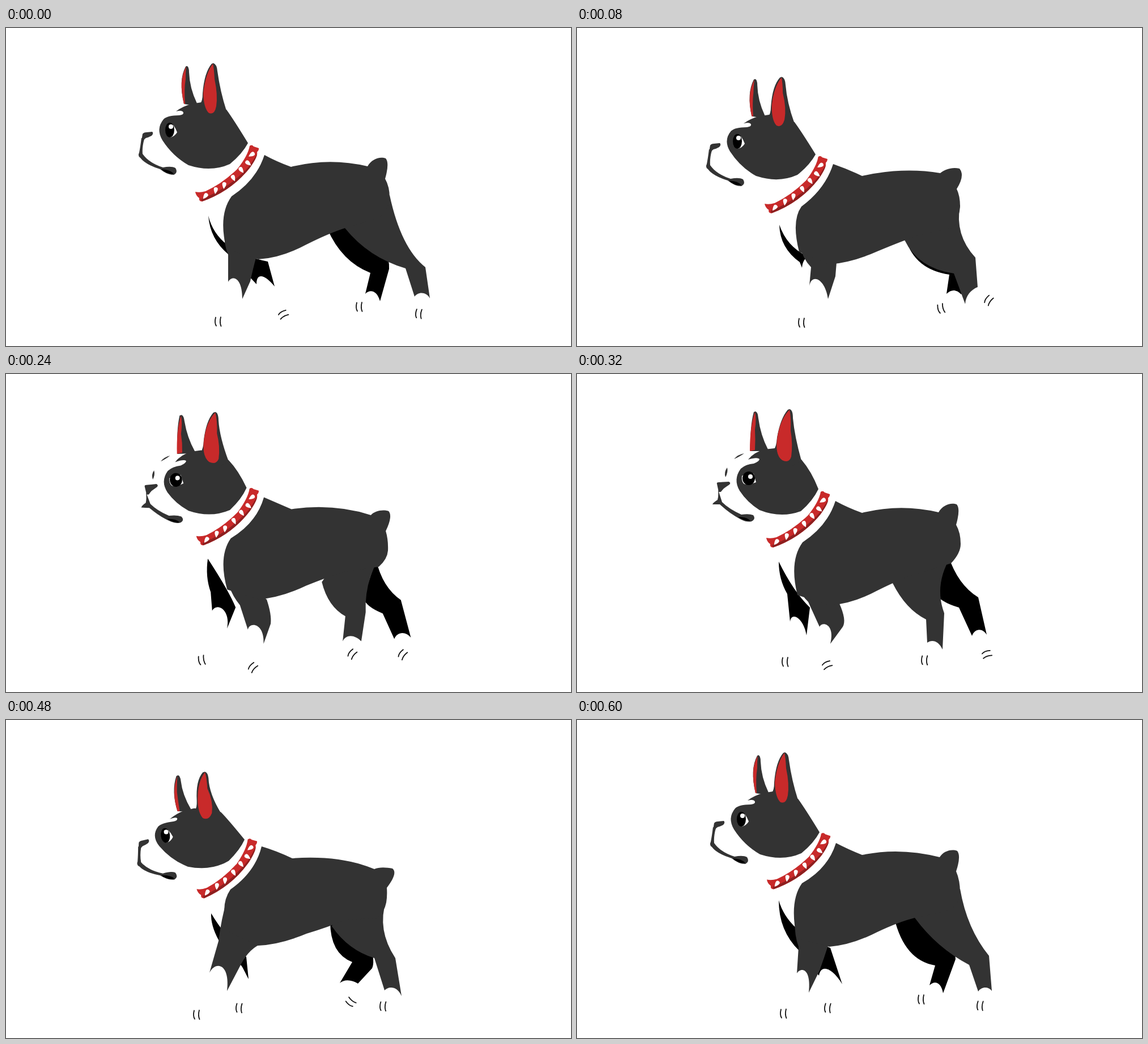
Animation, 997 px wide and 561 px high, one loop 0.64 s. Source, as an HTML page:

```html
<!DOCTYPE html>
<html lang="en">
<head>
<meta charset="utf-8">
<title>Walking dog</title>
<style>
  html, body { margin: 0; width: 100%; height: 100%; overflow: hidden; background: #fff; }
  svg { display: block; width: 100%; height: 100%; }
  .coat { fill: #333; }
  .shade { fill: #000; }
  .red { fill: #c82a2a; }
  .wine { fill: #8e1f1f; }
  .white { fill: #fff; }
  .toes { fill: none; stroke: #111; stroke-width: 1.8; stroke-linecap: round; }
</style>
</head>
<body>
<svg id="stage" viewBox="0 0 997 561">
  <g id="far"></g>
  <g id="near"></g>
  <g id="collar">
    <path class="red" d="M334 289Q342 291 352 288Q381 275 408 249Q427 225 430 208Q434 205 437 209L446 212Q447 215 443 219Q445 226 430 247Q397 288 346 306Q340 306 341 300Q335 296 334 289Z"/>
    <path class="wine" d="M443 222Q443 229 430 247Q397 288 346 306L344 302Q392 284 427 246Q437 233 443 222Z"/>
  </g>
  <g id="head"></g>
</svg>
<script>
const CYCLE = 640, STEP = 40, STRIDE = CYCLE / 2;
const NUMBER = /-?\d+(\.\d+)?/g;
const $ = id => document.getElementById(id);
const nums = s => s.match(NUMBER).map(Number);

function add(parent, cls, d) {
  const el = document.createElementNS('http://www.w3.org/2000/svg', 'path');
  el.setAttribute('class', cls);
  if (d) el.setAttribute('d', d);
  return parent.appendChild(el);
}

// Puts new numbers into a path of the same structure.
function reshape(template, values) {
  let i = 0;
  return template.replace(NUMBER, () => ' ' + +values[i++].toFixed(1));
}

// Periodic smooth curve through poses keyed by time in ms.
function track(keys, period) {
  const times = Object.keys(keys).map(Number);
  const poses = times.map(t => nums(keys[t]));
  const n = times.length;
  const knot = i => {
    const lap = Math.floor(i / n), k = i - lap * n;
    return { t: times[k] + lap * period, v: poses[k] };
  };
  return time => {
    const t = time % period;
    let i = n - 1;
    while (times[i] > t) i--;
    const [a, b, c, d] = [-1, 0, 1, 2].map(o => knot(i + o));
    const h = c.t - b.t, u = (t - b.t) / h, u2 = u * u, u3 = u2 * u;
    return b.v.map((p, j) => {
      const m0 = (c.v[j] - a.v[j]) / (c.t - a.t) * h;
      const m1 = (d.v[j] - p) / (d.t - b.t) * h;
      return (2 * u3 - 3 * u2 + 1) * p + (u3 - 2 * u2 + u) * m0
           + (3 * u2 - 2 * u3) * c.v[j] + (u3 - u2) * m1;
    });
  };
}

const updates = [];

function shape(parent, cls, keys, period = CYCLE) {
  const el = add($(parent), cls), at = track(keys, period);
  updates.push(t => el.setAttribute('d', reshape(keys[0], at(t))));
}

// Keys are x, y and angle.
function toes(parent, keys) {
  const el = add($(parent), 'toes', 'M-4-7.5Q-6.5 2-3 7.5M5-8Q2.5 1 5.5 8'), at = track(keys, CYCLE);
  updates.push(t => {
    const [x, y, r] = at(t);
    el.setAttribute('transform', `translate(${x} ${y}) rotate(${r})`);
  });
}

// Far legs
shape('far', 'shade', {
  0: 'M567 354Q592 412 643 432L634 469C643 460 655 464 660 482L676 425Q678 395 640 330Z',
  80: 'M580 372Q596 426 657 435L652 469C660 462 668 460 678 470L690 440Q670 400 640 370Z',
  160: 'M625 400Q628 424 655 436L667 469C672 460 686 458 696 468L683 408Q658 385 650 345Z',
  320: 'M630 385Q640 402 674 412L697 462C702 448 716 448 723 460L708 394Q672 372 655 320Z',
  400: 'M640 380Q645 420 668 432L674 439C677 440 680 443 682 445L686 390Q668 380 660 355Z',
  480: 'M572 355Q572 412 611 427L589 464C597 457 610 458 621 465L646 438Q656 416 620 335Z',
  600: 'M560 350Q578 424 632 433L622 468C632 458 643 464 646 482L668 422Q668 395 625 330Z'
});
shape('far', 'shade', {
  0: 'M357 331Q360 372 392 399L442 452C442 430 458 436 474 456L462 412Q372 394 357 331Z',
  80: 'M357 347Q358 388 393 413L397 423C398 412 402 408 405 405L405 402Q370 385 357 347Z',
  160: 'M357 328Q350 362 360 390L364 403C378 394 398 408 382 432L402 414Q400 386 357 328Z',
  320: 'M356 331Q356 362 371 388L376 437C378 418 400 430 405 461L411 412Q382 384 356 331Z',
  400: 'M361 358Q366 388 390 416L418 446C420 450 421 454 423 459L424 438Q374 394 361 358Z',
  480: 'M362 341Q361 362 375 388L414 432C418 436 422 446 428 457L424 418Q385 380 362 341Z',
  600: 'M356 318Q356 372 392 407L427 451C430 432 448 434 468 466L447 402Q372 374 356 318Z'
});
toes('far', { 0: '623 492 0', 80: '642 495 -14', 160: '666 492 0', 320: '723 494 72', 400: '688 472 65', 480: '608 498 -50', 600: '607 493 0' });
toes('far', { 0: '489 505 62', 80: '434 424 20', 160: '369 471 -55', 240: '345 505 -10', 320: '367 508 0', 400: '395 508 0', 480: '411 508 4', 600: '442 508 5' });

// Near legs and trunk
shape('near', 'coat', {
  0: 'M598 353Q640 405 705 424L721 474C726 466 741 464 748 477L740 422Q697 388 677 295L590 320Z',
  40: 'M588 364Q625 412 695 430L722 480C728 470 738 464 750 462L737 414Q690 385 677 304L590 320Z',
  80: 'M578 374Q602 424 665 433L685 487C686 472 695 462 707 457L703 405Q666 365 676 312L590 320Z',
  160: 'M563 367Q565 408 596 423L590 472C594 452 612 452 626 457L636 418Q646 352 672 310L590 320Z',
  320: 'M557 369Q580 415 616 433L618 474C626 468 638 470 645 486L648 422Q625 360 677 298L590 320Z',
  400: 'M575 375Q598 418 633 431L642 477C648 470 662 470 667 485L669 432Q648 375 676 312L590 320Z',
  480: 'M575 364Q604 406 650 420L668 477C674 470 690 468 698 487L687 420Q654 370 671 318L590 320Z',
  600: 'M596 349Q635 402 692 432L708 479C714 470 726 470 732 478L727 416Q688 368 676 298L590 320Z'
});
shape('near', 'coat', {
  0: 'M398 310Q376 362 392 400L392 448C398 436 417 438 417 478L431 447Q436 424 441 406Z',
  80: 'M396 330Q382 390 413 422L410 455C414 432 438 442 443 478L456 438Q457 425 458 414Z',
  160: 'M392 340Q388 375 414 415L417 454C420 434 448 438 452 475L458 434Q456 415 456 395Z',
  320: 'M392 340Q384 380 408 402L428 446C432 436 456 440 447 476L469 446Q476 434 463 405Z',
  400: 'M394 340Q385 385 387 405L383 432C400 416 412 440 396 467L428 437Q440 427 455 413Z',
  480: 'M390 316Q380 350 375 390L359 446C370 424 396 430 390 478L411 438Q426 406 448 396Z',
  600: 'M396 305Q376 360 391 400L388 447C394 436 414 436 409 481L428 442Q436 420 443 398Z'
});
shape('near', 'coat', {
  0: 'M456 224Q478 236 503 245Q570 228 638 244C645 231 660 226 670 230Q677 238 669 266Q677 280 677 300Q677 316 660 334L598 353Q570 362 530 382Q485 406 445 408L389 390Q374 330 398 297Q442 268 456 224Z',
  80: 'M452 240Q478 249 503 261Q575 245 641 256C650 249 662 245 675 248Q685 260 670 284Q676 296 676 315Q675 332 665 352L605 365Q578 374 530 394Q485 414 445 417L392 395Q378 340 396 315Q438 284 452 240Z',
  160: 'M451 223Q478 231 505 244Q590 238 650 263C658 259 672 260 682 262Q692 270 672 296Q673 310 671 322Q668 338 655 350L600 352Q570 365 530 377Q485 396 445 398L395 375Q375 330 396 299Q440 268 451 223Z',
  280: 'M457 217Q478 228 503 238Q570 224 640 242C646 232 660 227 671 231Q678 240 669 267Q676 283 676 305Q676 320 660 335L596 349Q568 356 530 374Q485 397 445 400L388 385Q374 320 397 288Q443 262 457 217Z'
}, STRIDE);
toes('near', { 0: '728 504 6', 40: '757 489 40', 80: '726 480 36', 160: '628 482 70', 320: '613 505 2', 400: '635 505 0', 480: '665 505 3', 600: '711 504 5' });
toes('near', { 0: '374 518 0', 80: '396 520 0', 160: '416 520 0', 320: '441 513 65', 400: '382 504 -60', 480: '336 520 0', 600: '364 518 0' });

// Collar: spikes are x, y and angle
for (const [x, y, r] of [[352, 296, 38], [370, 286, 8], [385, 277, 6], [401, 264, -25], [415, 250, -35], [427, 238, -50], [434, 223, 58]])
  add($('collar'), 'white', 'M0 7Q-5-1-3-4Q0-6.5 3-4Q5-1 0 7Z').setAttribute('transform', `translate(${x} ${y}) rotate(${r})`);
const collarAt = track({ 0: '0 0 0', 80: '-3.5 20 -1', 160: '0 5.5 -4', 280: '1 -7.5 0' }, STRIDE);
updates.push(t => {
  const [x, y, r] = collarAt(t);
  $('collar').setAttribute('transform', `translate(${x} ${y}) rotate(${r} 390 256)`);
});

// Head: each part in profile, turned to the viewer and, for some, with ears dropped
const headParts = [
  ['coat',
    'M319 67Q323 68 323 78Q324 106 337 133L326 136L314 134Q304 92 317 68Z',
    'M315 66Q319 67 320 78Q324 108 337 133L325 136L306 136Q305 92 312 67Z',
    'M323 77Q327 78 327 88Q327 112 339 139L328 142L315 140Q308 104 320 78Z'],
  ['red',
    'M318 68Q304 92 314 134L316 134Q314 108 317 90Q317 76 318 68Z',
    'M314 67Q305 92 305 136L314 134Q315 116 314 98Q317 78 314 67Z',
    'M322 78Q308 104 315 140L319 140Q318 118 318 106Q320 86 322 78Z'],
  ['coat',
    'M427 203Q417 222 395 240Q362 255 322 242Q294 226 276 198Q264 178 278 161Q285 154 306 154Q314 153 313 149Q311 144 300 147Q312 138 327 134L345 131L389 144Q402 162 427 203Z',
    'M426 203Q416 224 395 242Q360 255 322 240Q300 226 287 206Q275 186 289 167Q298 159 312 158Q322 154 322 150Q318 146 302 151Q312 138 331 133L349 131L396 151Q414 172 426 203Z',
    'M427 203Q417 220 395 237Q362 252 322 239Q294 224 276 197Q264 178 278 163Q285 157 306 157Q314 156 313 152Q311 149 300 152Q312 144 327 140L345 138L391 150Q402 164 427 203Z'],
  ['coat',
    'M366 62Q372 64 373 76Q378 112 389 146L372 160L342 134Q347 130 347 115Q350 78 363 63Z',
    'M375 62Q381 63 381 78Q384 110 396 153L376 164L347 134Q352 128 353 112Q359 78 372 63Z',
    'M371 76Q376 78 376 88Q374 116 391 152L374 166L346 141Q350 138 351 125Q353 90 367 77Z'],
  ['red',
    'M365 63Q352 80 348 115Q349 142 358 150Q368 154 371 138Q374 118 368 90Q367 70 365 63Z',
    'M375 63Q360 78 354 108Q348 142 362 152Q374 158 378 146Q381 124 377 100Q378 76 375 63Z',
    'M371 77Q358 90 354 115Q349 144 358 157Q368 163 375 150Q380 130 372 106Q373 86 371 77Z'],
  ['white',
    'M284 188Q285 192 290 193Q298 191 302 184Q299 176 295 171Q288 170 284 188Z',
    'M291 180Q290 190 295 194Q303 196 316 191Q314 184 312 176Q300 172 291 180Z'],
  ['shade',
    'M281 180A8 13 0 1 0 297 180A8 13 0 1 0 281 180Z',
    'M292 184A11 12 0 1 0 314 184A11 12 0 1 0 292 184Z'],
  ['white',
    'M287 174A4 4 0 1 0 295 174A4 4 0 1 0 287 174Z',
    'M302 181A4 4 0 1 0 310 181A4 4 0 1 0 302 181Z'],
  ['coat',
    'M239 199L241 187Q243 184 248 184L258 183Q261 186 257 190Q252 193 247 194Q244 196 242 199Z',
    'M250 208L247 194Q246 191 250 191L268 190Q272 192 269 195Q263 199 259 202Q256 205 254 208Z'],
  ['coat',
    'M239 194Q237 210 235 220Q232 226 237 229Q246 241 272 249Q284 259 296 259Q304 255 299 247Q292 243 277 246Q252 238 241 222Q240 210 244 196Z',
    'M249 204Q250 216 248 222Q240 227 239 230Q246 230 252 230Q270 247 290 257Q300 262 308 260Q316 256 311 249Q304 246 290 248Q268 238 256 226Q253 218 254 206Z'],
  ['shade',
    'M274 249Q284 259 296 257Q290 250 274 249Z',
    'M284 252Q296 260 306 259Q300 252 284 252Z'],
  ['coat',
    'M272 150Q272 150 272 150Q272 150 272 150Z',
    'M277 150Q284 142 295 140Q285 147 277 150Z'],
  ['coat',
    'M252 172Q252 172 252 172Q252 172 252 172Z',
    'M265 165Q259 173 262 182Q267 173 265 165Z']
].map(([cls, side, turned, dropped = side]) => ({
  el: add($('head'), cls), side, a: nums(side), b: nums(turned), c: nums(dropped)
}));

// Keys are x, y, angle, turn and ear drop.
const headAt = track({
  0: '0 0 0 0 0', 80: '-6 20 0 0 0.3', 160: '-7 7 -6.5 0.72 1',
  280: '1 -5 0 1 0', 320: '0 0 0 1 0', 400: '-6 20 0 0.95 0.3',
  480: '-6 8 -6.5 0 1', 600: '1 -5 0 0 0'
}, CYCLE);
const clamp = v => Math.min(1, Math.max(0, v));
updates.push(t => {
  const [x, y, r, turn, drop] = headAt(t);
  const w = clamp(turn), f = clamp(drop);
  $('head').setAttribute('transform', `translate(${x} ${y}) rotate(${r} 427 203)`);
  for (const { el, side, a, b, c } of headParts)
    el.setAttribute('d', reshape(side, a.map((p, i) => p + w * (b[i] - p) + f * (c[i] - p))));
});

const start = performance.now();
function draw() {
  const t = Math.floor((performance.now() - start) / STEP) * STEP % CYCLE;
  updates.forEach(update => update(t));
  requestAnimationFrame(draw);
}
draw();
</script>
</body>
</html>
```
